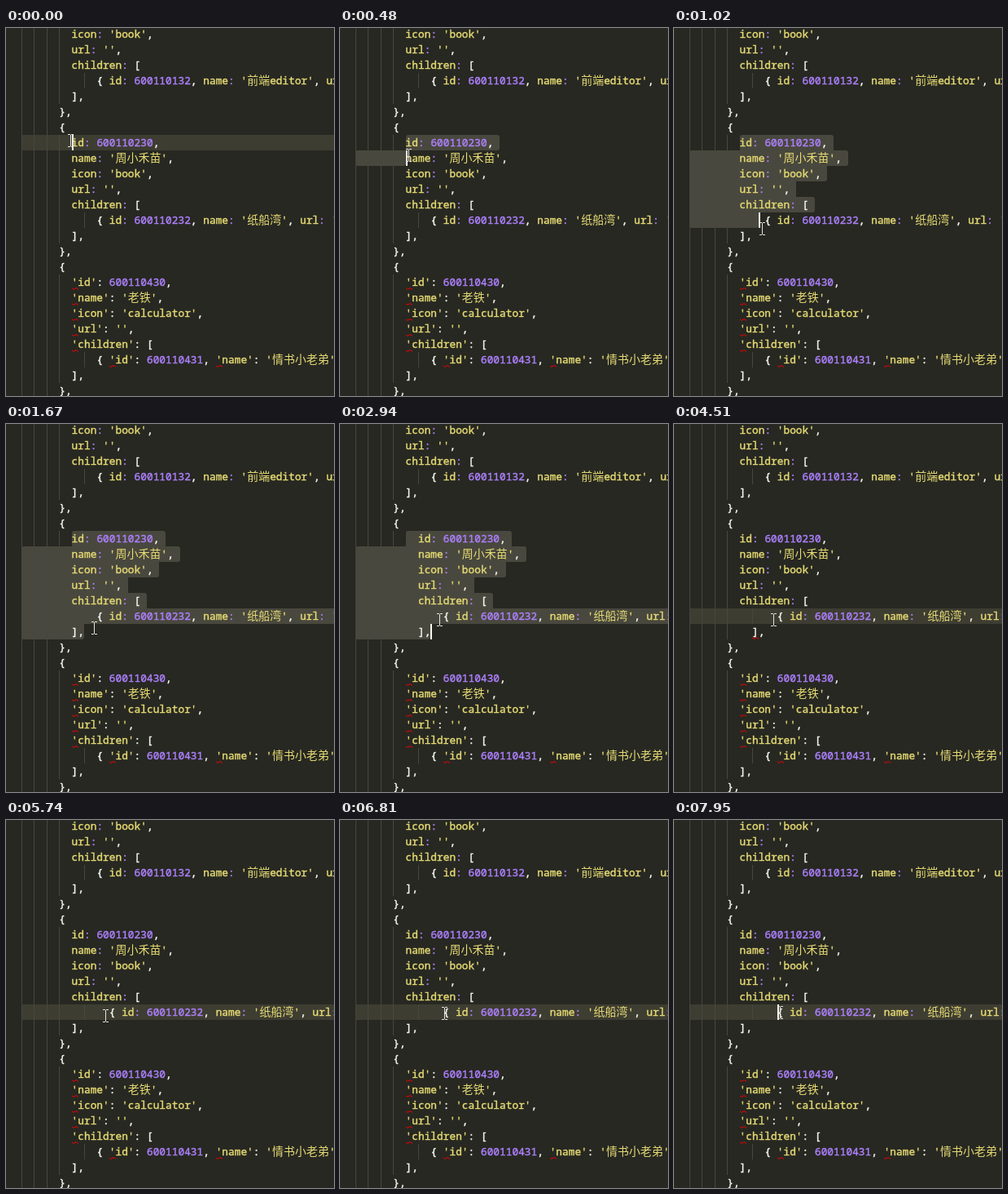
Recreate the animation shown at these times as an HTML page with a canvas. Size 403 by 451 pixels, loop 8000 ms.

```html
<!DOCTYPE html>
<html lang="zh">
<head>
<meta charset="utf-8">
<title>Code editor</title>
<style>
html, body { margin: 0; width: 100%; height: 100%; overflow: hidden; background: #272822; }
canvas { display: block; }
</style>
</head>
<body>
<canvas id="stage" width="403" height="451"></canvas>
<script>
const ctx = document.getElementById('stage').getContext('2d');
const W = 403, H = 451, LOOP = 8000;
const LEFT = 19, TOP = -2, ROW = 19, CELL = 7.698, WIDE = 14;
const MONO = '12.83px "Noto Sans Mono", "DejaVu Sans Mono", monospace';
const CJK = '14px "Noto Sans CJK SC", "Noto Sans CJK", sans-serif';
const COLOR = {
  back: '#272822', line: '#3e3d32', select: '#49483e', guide: '#464741',
  plain: '#f8f8f2', string: '#e6db74', number: '#ae81ff', error: '#f00000'
};

const LINES = `
        icon: 'book',
        url: '',
        children: [
            { id: 600110132, name: '前端editor', url: '',
        ],
      },
      {
        id: 600110230,
        name: '周小禾苗',
        icon: 'book',
        url: '',
        children: [
            { id: 600110232, name: '纸船湾', url: '',
        ],
      },
      {
        'id': 600110430,
        'name': '老铁',
        'icon': 'calculator',
        'url': '',
        'children': [
            { 'id': 600110431, 'name': '情书小老弟', 'url': '',
        ],
      },`.split('\n').slice(1).map(line => ({
  indent: line.search(/\S/),
  text: line.trim()
}));

// What the user does, and when
const DRAG = 480, DROP = 1140, TAB = 1950, CLICK = 3090;
const FIX = 3490, LINT = 3610, SAVE = 5180, RECLICK = 7030;
const BLINK = 460;
const FIRST = 7, CHILD = 12, LAST = 13;

// Pointer moves: from time, to time, end x, end top
const MOVES = [
  [90, 120, 81, 104], [120, 480, 84, 148], [600, 1020, 108, 238],
  [1100, DROP, 108, 242], [2260, 2500, 122, 232], [6300, 6930, 130, 228]
];

const within = (t, a, b) => t >= a && t < b;
const colX = col => LEFT + col * CELL;
const rowY = row => TOP + row * ROW;
const isWide = ch => ch > '\u2e80';
const widthOf = text => [...text].reduce((w, ch) => w + (isWide(ch) ? WIDE : CELL), 0);

function shiftOf(row, t) {
  const end = row < CHILD ? FIX : row === LAST ? SAVE : LOOP;
  return within(row, FIRST, LAST + 1) && within(t, TAB, end) ? 2 : 0;
}

const indentOf = (row, t) => LINES[row].indent + shiftOf(row, t);

function mouseAt(t) {
  let x = 79, y = 130;
  for (const [from, to, endX, endY] of MOVES) {
    const k = Math.min(1, Math.max(0, (t - from) / (to - from)));
    x += (endX - x) * k;
    y += (endY - y) * k;
  }
  return { x: Math.round(x), y: Math.round(y) };
}

// The caret sits where the pointer last pressed or dragged
function caretAt(t) {
  if (t < DRAG) return { row: FIRST, col: LINES[FIRST].indent };
  const pressed = t < DROP ? t : [RECLICK, CLICK, DROP].find(time => time <= t);
  const { x, y } = mouseAt(pressed);
  const row = Math.floor((y + 6 - TOP) / ROW);
  const lineEnd = indentOf(row, pressed) + LINES[row].text.length;
  const col = Math.min(Math.floor((x - LEFT) / CELL), lineEnd);
  return { row, col: col + (t < CLICK ? shiftOf(row, t) : 0) };
}

function caretVisible(t) {
  if (t < DROP) return true;
  const last = [RECLICK, SAVE, CLICK, TAB, DROP].find(time => time <= t);
  return Math.floor((t - last) / BLINK) % 2 === 0;
}

function fill(color, x, y, w, h) {
  ctx.fillStyle = color;
  ctx.fillRect(x, y, w, h);
}

function drawSelection(t, caret) {
  const spans = [];
  for (let row = FIRST; row <= caret.row; row++) {
    const lineEnd = colX(indentOf(row, t) + 1) + widthOf(LINES[row].text);
    spans.push({
      l: row === FIRST ? Math.round(colX(LINES[row].indent)) : LEFT,
      r: Math.round(row === caret.row ? colX(caret.col) : lineEnd)
    });
  }
  ctx.fillStyle = COLOR.select;
  spans.forEach((s, i) => {
    const left = n => !n || n.l > s.l ? 3 : 0;
    const right = n => !n || n.r < s.r ? 3 : 0;
    const up = spans[i - 1], down = spans[i + 1];
    ctx.beginPath();
    ctx.roundRect(s.l, rowY(FIRST + i), s.r - s.l, ROW,
      [left(up), right(up), right(down), left(down)]);
    ctx.fill();
  });
}

function drawGuides() {
  LINES.forEach(({ indent }, row) => {
    for (let col = 0; col < indent; col += 2) {
      if (col !== 8) fill(COLOR.guide, Math.round(colX(col)), rowY(row), 1, ROW);
    }
  });
}

function drawSquiggle(x, row) {
  const y = rowY(row) + ROW - 3;
  x = Math.round(x);
  ctx.save();
  ctx.beginPath();
  ctx.rect(x, y, 8, 3);
  ctx.clip();
  ctx.strokeStyle = COLOR.error;
  ctx.lineWidth = 1;
  ctx.beginPath();
  ctx.moveTo(x - 1, y);
  for (let i = 0; i < 4; i++) ctx.lineTo(x + 2 + i * 3, y + (i % 2 ? 0.5 : 2.5));
  ctx.stroke();
  ctx.restore();
}

// Draws text in runs of one script and returns the next x
function drawText(text, x, y, color) {
  ctx.fillStyle = ctx.strokeStyle = color;
  ctx.lineWidth = 0.4;
  for (const run of text.match(/[\u2e80-\uffff]+|[^\u2e80-\uffff]+/g)) {
    const wide = isWide(run[0]);
    ctx.font = wide ? CJK : MONO;
    ctx.fillText(run, x, y);
    if (!wide) ctx.strokeText(run, x, y); // slightly heavier Latin
    x += widthOf(run);
  }
  return x;
}

function drawLine(row, t) {
  const y = rowY(row) + 14;
  let x = colX(indentOf(row, t));
  for (const token of LINES[row].text.match(/'[^']*':?|[a-z]+:|\d+|\s+|./g)) {
    if (/.:$/.test(token)) {
      const quoted = token[0] === "'";
      if (quoted) drawSquiggle(x, row);
      x = drawText(token.slice(0, -1), x, y, COLOR.string);
      x = drawText(':', x, y, quoted ? COLOR.plain : COLOR.number);
    } else {
      const kind = token[0] === "'" ? 'string' : /\d/.test(token) ? 'number' : 'plain';
      x = drawText(token, x, y, COLOR[kind]);
    }
  }
}

function drawMouse({ x, y }) {
  const c = '#e4e4e0';
  for (const edge of [y, y + 15]) {
    fill(c, x - 3, edge, 3, 1);
    fill(c, x + 1, edge, 3, 1);
  }
  fill(c, x, y + 1, 1, 14);
}

function draw(t) {
  const caret = caretAt(t);
  fill(COLOR.back, 0, 0, W, H);
  if (within(t, DRAG, CLICK)) drawSelection(t, caret);
  else fill(COLOR.line, LEFT, rowY(caret.row), W - LEFT, ROW);
  drawGuides();
  LINES.forEach((_, row) => drawLine(row, t));
  if (within(t, LINT, SAVE)) drawSquiggle(colX(indentOf(LAST, t)), LAST);
  if (caretVisible(t)) {
    fill('#f8f8f0', Math.round(colX(caret.col)), rowY(caret.row), 2, ROW);
  }
  drawMouse(mouseAt(t));
}

const start = performance.now();
function tick() {
  draw((performance.now() - start) % LOOP);
  requestAnimationFrame(tick);
}
tick();
</script>
</body>
</html>
```
